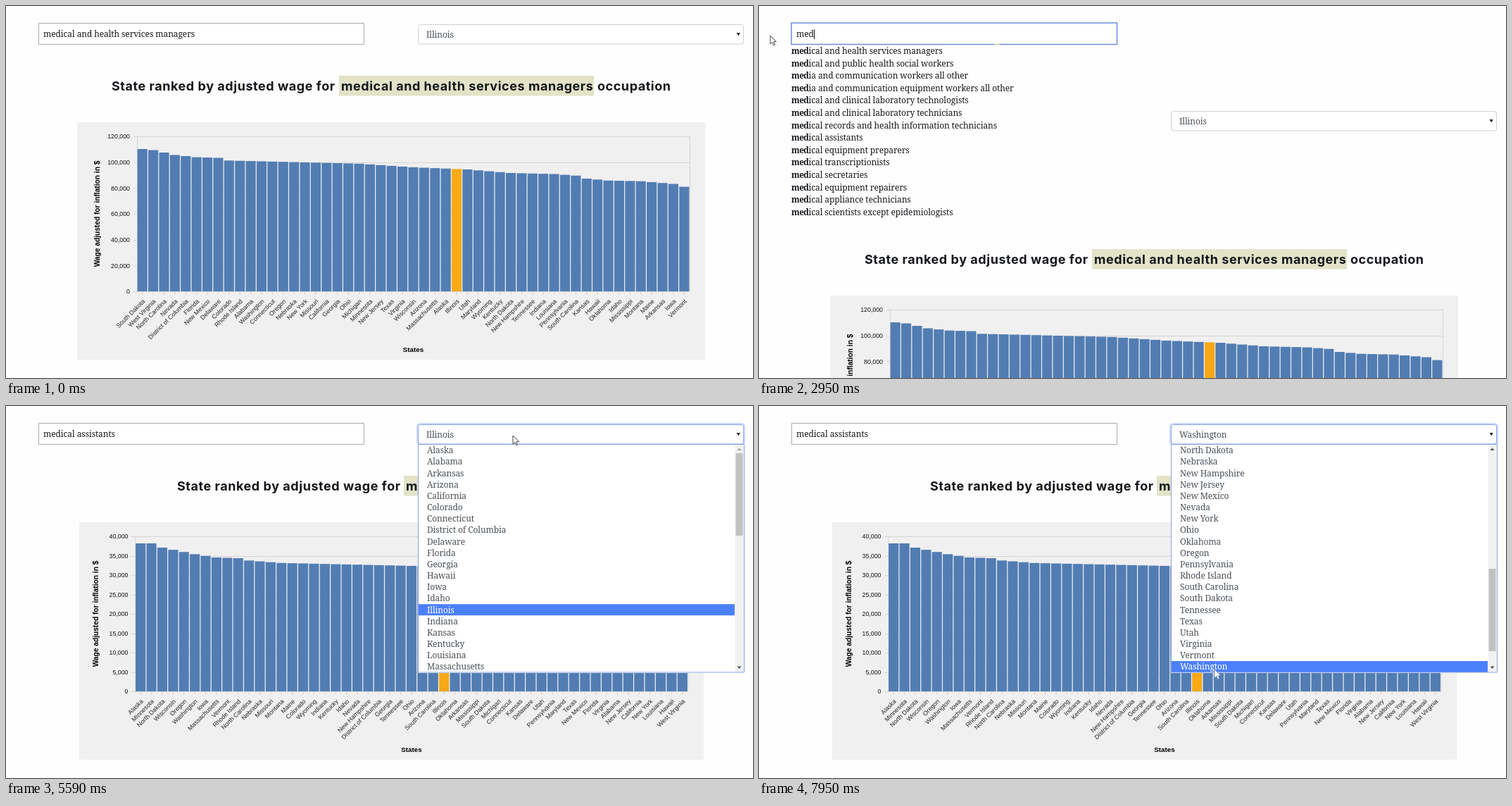
Animation, 1061 px wide and 528 px high, one loop 8 s. Source, as an HTML page with a canvas:

```html
<!DOCTYPE html>
<html lang="en">
<head>
<meta charset="utf-8">
<title>State wage ranking</title>
<style>
  html, body { margin: 0; width: 100%; height: 100%; overflow: hidden; background: #fefefe; }
  canvas { display: block; }
</style>
</head>
<body>
<canvas id="stage" width="1061" height="528"></canvas>
<script>
const ctx = document.getElementById('stage').getContext('2d');
const LOOP = 8000;
const SERIF = '"Noto Serif", serif', SANS = 'Inter, sans-serif';
const ARIAL = '"Liberation Sans", Arial, sans-serif';
const ROW = 17.6;        // suggestion line height
const OPTION = 16.16;    // drop-down line height
const INK = '#16191d', MUTED = '#495057', GRID = '#d5d5d5', FOCUS = '#8aa5e4';
const list = s => s.split(',');

const jobs = list('marketing managers,management analysts,medical and health services managers,' +
  'market research analysts,mathematicians,meeting convention and event planners,materials engineers,' +
  'marine engineers and naval architects,mechanical engineers,mechanical drafters,mining and geological engineers,' +
  'mechanical engineering technicians,materials scientists,microbiologists,mental health counselors,' +
  'medical and public health social workers,mental health and substance abuse social workers,' +
  'marriage and family therapists,media and communication workers all other,' +
  'media and communication equipment workers all other,multimedia artists and animators,' +
  'musicians and singers,medical and clinical laboratory technologists,' +
  'medical and clinical laboratory technicians,medical records and health information technicians,' +
  'massage therapists,medical assistants,medical equipment preparers,medical transcriptionists,' +
  'maids and housekeeping cleaners,manicurists and pedicurists,merchandise displayers and window trimmers,' +
  'meter readers utilities,medical secretaries,mechanical door repairers,mobile heavy equipment mechanics,' +
  'medical equipment repairers,medical appliance technicians,medical scientists except epidemiologists,' +
  'metal-refining furnace operators,meat poultry and fish cutters and trimmers,mechanical insulation workers,' +
  'metal workers and plastic workers all other,merchant wholesalers all other,messengers and couriers,' +
  'mental health technicians,metal pourers and casters,meat packers,metal pickling operators');

const optionsTop = list('Alaska,Alabama,Arkansas,Arizona,California,Colorado,Connecticut,District of Columbia,' +
  'Delaware,Florida,Georgia,Hawaii,Iowa,Idaho,Illinois,Indiana,Kansas,Kentucky,Louisiana,Massachusetts');
const optionsEnd = list('North Dakota,Nebraska,New Hampshire,New Jersey,New Mexico,Nevada,New York,Ohio,Oklahoma,' +
  'Oregon,Pennsylvania,Rhode Island,South Carolina,South Dakota,Tennessee,Texas,Utah,Virginia,Vermont,Washington');

// slope: a few [bar index, bar top] points, joined by straight lines
const managers = {
  job: 'medical and health services managers', titleX: 150, markX: 473, markEnd: 835,
  panel: [101, 892], x: 186, max: 120000, step: 20000,
  states: list('South Dakota,West Virginia,North Carolina,Nevada,District of Columbia,Florida,New Mexico,Delaware,' +
    'Colorado,Rhode Island,Alabama,Washington,Connecticut,Oregon,Nebraska,New York,Missouri,California,Georgia,Ohio,' +
    'Michigan,Minnesota,New Jersey,Texas,Virginia,Wisconsin,Arizona,Massachusetts,Alaska,Illinois,Utah,Maryland,' +
    'Wyoming,Kentucky,North Dakota,New Hampshire,Tennessee,Indiana,Louisiana,Pennsylvania,South Carolina,Kansas,' +
    'Hawaii,Oklahoma,Idaho,Mississippi,Montana,Maine,Arkansas,Iowa,Vermont'),
  slope: [[0, 203], [1, 204.5], [3, 211.5], [5, 214.6], [7, 215.5], [8, 219.3], [20, 223.8], [25, 228.9],
    [30, 232], [34, 237], [38, 238.5], [40, 240.7], [41, 245], [43, 247.7], [46, 248.7], [49, 252.5], [50, 256.6]]
};
const assistants = {
  job: 'medical assistants', titleX: 243, markX: 565, markEnd: 742,
  panel: [104, 887], x: 183.5, max: 40000, step: 5000,
  states: list('Alaska,Minnesota,North Dakota,Wisconsin,Oregon,Washington,Iowa,Massachusetts,Vermont,Rhode Island,' +
    'North Carolina,Nebraska,Missouri,Montana,Maine,Colorado,Wyoming,Indiana,Kentucky,Idaho,Nevada,New Hampshire,' +
    'District of Columbia,Georgia,Tennessee,Ohio,Arizona,South Carolina,Illinois,Oklahoma,Arkansas,Mississippi,' +
    'South Dakota,Michigan,Connecticut,Kansas,Delaware,Utah,Pennsylvania,Maryland,Texas,New Mexico,Florida,Virginia,' +
    'Alabama,New Jersey,California,New York,Louisiana,Hawaii,West Virginia'),
  slope: [[0, 195], [1, 195], [2, 201], [5, 210.3], [7, 215], [9, 216], [10, 219.3], [13, 222.8], [25, 226.9],
    [44, 235], [50, 250]]
};

// Pointer waypoints: time, x, y and the number of jumps that lead there
const waypoints = [
  [440, 965, 238, 1], [910, 338, 43, 3], [1380, 16, 42, 3], [3565, 16, 42, 1], [4180, 76, 185, 4],
  [4640, 76, 185, 1], [5270, 720, 42, 4], [6360, 720, 42, 1], [7000, 686, 89, 4], [7470, 660, 303, 3],
  [7950, 647, 374, 3]
];
const typed = [[2300, 'm'], [2620, 'me'], [2950, 'med'], [3080, 'medi']];
const presses = [[910, 1690], [4490, 4640], [5270, 5590]];

const within = (t, a, b) => t >= a && t < b;
const mix = (a, b, k) => a + (b - a) * k;

function barTop(slope, i) {
  const n = slope.findIndex(p => p[0] >= i);
  if (n === 0) return slope[0][1];
  const [i0, y0] = slope[n - 1], [i1, y1] = slope[n];
  return mix(y0, y1, (i - i0) / (i1 - i0));
}

function pointerAt(t) {
  const n = waypoints.findIndex(w => w[0] > t);
  if (n === 0) return null;
  if (n < 0) return waypoints.at(-1).slice(1, 3);
  const [t0, x0, y0] = waypoints[n - 1], [t1, x1, y1, jumps] = waypoints[n];
  const k = Math.floor((t - t0) / (t1 - t0) * jumps + 1e-6) / jumps;
  return [mix(x0, x1, k), mix(y0, y1, k)];
}

function rect(x, y, w, h, color) {
  ctx.fillStyle = color;
  ctx.fillRect(x, y, w, h);
}

function frame(x, y, w, h, r, color, width = 1) {
  ctx.strokeStyle = color;
  ctx.lineWidth = width;
  ctx.beginPath();
  ctx.roundRect(x, y, w, h, r);
  ctx.stroke();
}

function shape(points, color) {
  ctx.fillStyle = color;
  ctx.beginPath();
  points.forEach(p => ctx.lineTo(...p));
  ctx.closePath();
  ctx.fill();
}

function text(s, x, y, font, color, { align = 'left', spacing = 0, turn = 0, base = 'alphabetic' } = {}) {
  ctx.save();
  ctx.translate(x, y);
  ctx.rotate(turn);
  ctx.font = font;
  ctx.letterSpacing = spacing + 'px';
  ctx.textAlign = align;
  ctx.textBaseline = base;
  ctx.fillStyle = color;
  ctx.fillText(s, 0, 0);
  const w = ctx.measureText(s).width;
  ctx.restore();
  return w;
}

const serif = (s, x, y, color = INK) => text(s, x, y, '12px ' + SERIF, color, { spacing: -0.1 });

function drawInput(value, focus, caret, selectFrom) {
  rect(46, 24, 463, 31, '#fff');
  if (focus) frame(46, 24, 462.5, 30.5, 0, '#6f8de0', 1.5);
  else frame(46.5, 24.5, 462, 30, 0, '#a9a9a9');
  if (selectFrom < 268) rect(selectFrom, 32, 268 - selectFrom, 15, '#f6d343');
  const w = serif(value, 53, 44);
  if (caret) rect(Math.round(53 + w), 33, 1, 14, '#111');
}

function drawSuggestions(query, items) {
  items.forEach((job, i) => {
    const y = 68 + i * ROW;
    const w = text(query, 46, y, 'bold 11.8px ' + SERIF, INK, { spacing: -0.5 });
    serif(job.slice(query.length), 46 + w, y);
  });
}

function drawSelect(value, dy, focus) {
  const y = 26.5 + dy;
  if (focus) frame(584.5, y - 1, 464, 29.5, 4, '#cddafb', 3);
  rect(586, y, 461, 27.5, '#fff');
  frame(585.5, y, 462, 27.5, 3, focus ? FOCUS : '#ced0d3');
  serif(value, 597, 45 + dy, MUTED);
  shape([[1037.5, 38 + dy], [1043, 38 + dy], [1040.2, 42.5 + dy]], '#333');
}

function drawOptions(options, active, atTop) {
  rect(585, 55, 464, 324, '#fff');
  options.forEach((name, i) => {
    const y = 63 + i * OPTION;
    if (i === active) rect(586, y - 8, 449, 16, '#4b80fb');
    serif(name, 598, y + 4.3, i === active ? '#fff' : MUTED);
  });
  rect(1035.5, 55, 12.5, 323, '#f1f1f1');
  rect(1036.5, atTop ? 67 : 231, 10, 117, '#c1c1c1');
  shape([[1038.5, 63], [1044.5, 63], [1041.5, 59.5]], atTop ? '#a3a3a3' : '#505050');
  shape([[1038.5, 369.5], [1044.5, 369.5], [1041.5, 373]], '#505050');
  frame(585.5, 54.5, 463, 323.5, 0, FOCUS);
}

function drawTitle(c, dy) {
  const y = 119.5 + dy;
  const put = (s, x) => text(s, x, y, 'bold 18px ' + SANS, '#14171b', { spacing: 0.55 });
  put('State ranked by adjusted wage for', c.titleX);
  rect(c.markX, 99 + dy, c.markEnd - c.markX, 28.5, '#e2e3c7');
  put(c.job, c.markX + 3);
  put('occupation', c.markEnd + 5);
}

function drawChart(c, dy) {
  const width = 785, step = width / c.states.length, font = '8.8px ' + ARIAL;
  ctx.save();
  ctx.translate(0, dy);
  rect(c.panel[0], 165, c.panel[1], 337, '#f0f0f0');
  for (let v = 0; v <= c.max; v += c.step) {
    const y = 405 - 220 * v / c.max;
    rect(c.x - 5, Math.round(y), width + 5, 1, GRID);
    text(v.toLocaleString('en-US'), c.x - 10, y + 3.3, font, '#111', { align: 'right' });
  }
  rect(c.x, 185, 1, 220, GRID);
  rect(c.x + width, 185, 1, 220, GRID);
  c.states.forEach((name, i) => {
    const x = c.x + i * step, mid = x + step / 2, top = barTop(c.slope, i);
    rect(x + step * 0.04, top, step * 0.92, 405 - top, name === 'Illinois' ? '#f9a916' : '#527db3');
    rect(mid - 0.5, 405, 1, 5, GRID);
    text(name, mid + 2.5, 418, font, '#222', { align: 'right', turn: -Math.PI / 4, base: 'middle' });
  });
  text('Wage adjusted for inflation in $', c.x - 53, 295, 'bold 10.2px ' + ARIAL, '#000',
    { align: 'center', turn: -Math.PI / 2 });
  text('States', c.x + width / 2, 491, 'bold 9.8px ' + ARIAL, '#000', { align: 'center' });
  ctx.restore();
}

function drawPointer(x, y, pressed, edge) {
  if (pressed) {
    ctx.save();
    ctx.globalCompositeOperation = 'multiply';
    ctx.fillStyle = '#fbf03c';
    ctx.beginPath();
    ctx.arc(x - 0.5, y + 2, 9, 0, 7);
    ctx.fill();
    ctx.restore();
  }
  const arrow = [[0, 0], [0, 12], [2.8, 9.4], [4.8, 13.8], [6.6, 13], [4.8, 8.7], [8.5, 8.6]];
  shape(arrow.map(([a, b]) => [x + a, y + b]), '#fff');
  ctx.strokeStyle = edge;
  ctx.lineWidth = 0.9;
  ctx.stroke();
}

function draw(t) {
  const chosen = t >= 4640, c = chosen ? assistants : managers;
  const query = chosen ? '' : typed.findLast(k => k[0] <= t)?.[1] ?? '';
  const items = query ? jobs.filter(j => j.startsWith(query)) : [];
  const shift = Math.round(items.length * ROW);
  const pointer = pointerAt(t);

  rect(0, 0, 1061, 528, '#fefefe');
  drawTitle(c, shift);
  drawChart(c, shift);

  const selectFrom = within(t, 910, 2300) ? Math.max(53, pointer[0]) : Infinity;
  drawInput(query || c.job, within(t, 910, 4490), within(t, 2300, 3720), selectFrom);
  if (within(t, 1070, 3720)) rect(334, 54, 8, 1, '#e5d56c');
  drawSuggestions(query, items);

  const jumped = t >= 6210, hovering = t >= 6510;
  drawSelect(jumped ? 'Washington' : 'Illinois', shift / 2, t >= 5430);
  if (t >= 5430) {
    const hover = Math.max(0, Math.round((pointer[1] - 63) / OPTION));
    drawOptions(jumped ? optionsEnd : optionsTop, hovering ? hover : jumped ? 19 : 14, !jumped);
  }
  if (pointer) drawPointer(...pointer, presses.some(p => within(t, ...p)), hovering ? '#8c9db8' : '#333');
}

const start = performance.now();
function tick(now) {
  draw(Math.max(0, now - start) % LOOP);
  requestAnimationFrame(tick);
}
draw(0);
requestAnimationFrame(tick);
</script>
</body>
</html>
```
